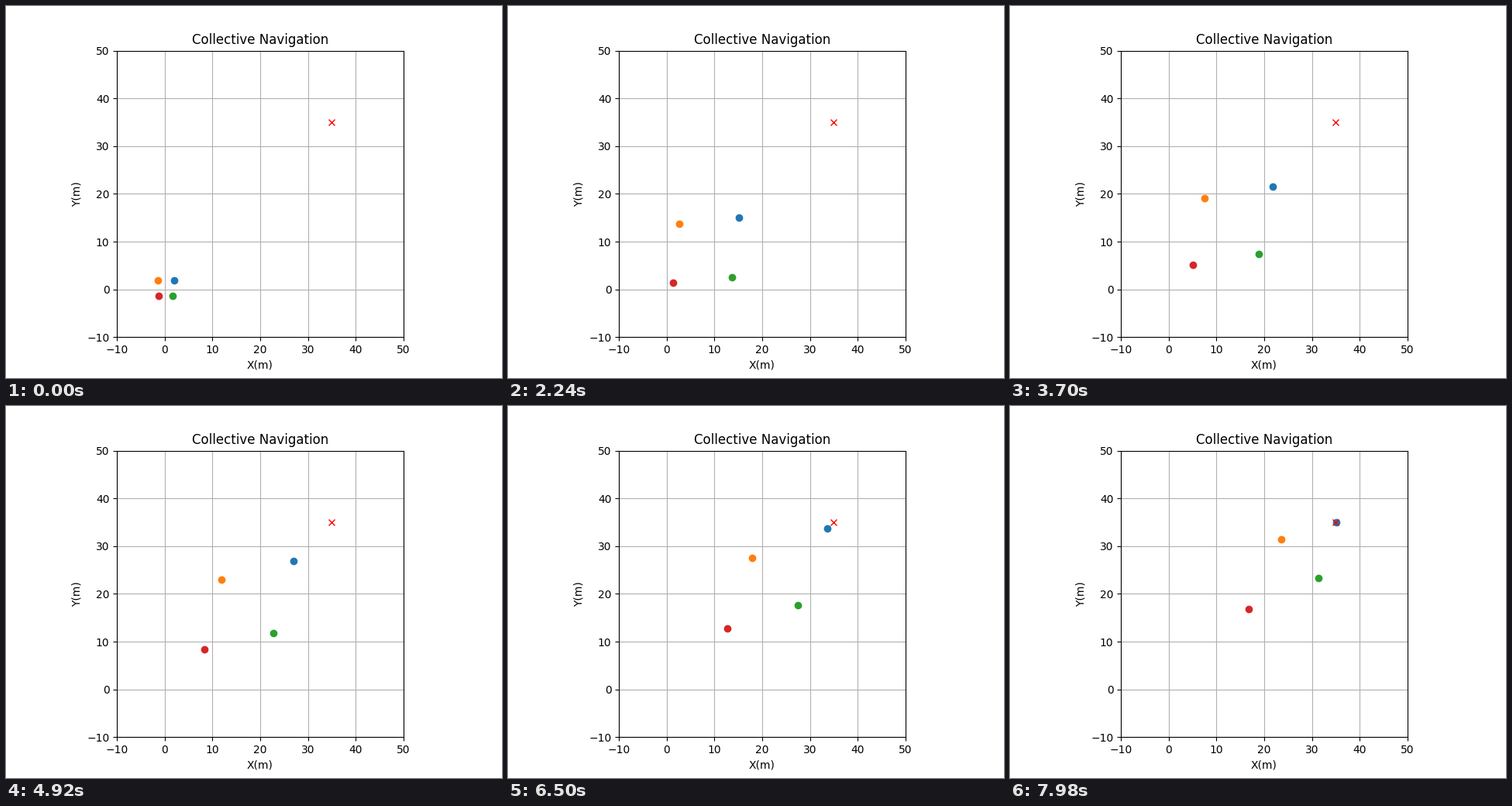
Write a matplotlib script that moves like this. It is 640 by 480 pixels and loops after 8 s.

```python
import numpy as np
import matplotlib.pyplot as plt
from matplotlib.animation import FuncAnimation

FRAMES, INTERVAL = 400, 20
DT = INTERVAL / 1000
SPEED = 5.0        # pull towards the goal, m/s
REPULSION = 125.0  # inverse-square push between agents
GOAL = np.array([35.0, 35.0])
START = np.array([[2.0, 1.9], [-1.35, 1.9], [1.7, -1.3], [-1.2, -1.3]])
COLORS = ["tab:blue", "tab:orange", "tab:green", "tab:red"]


def velocity(pos):
    to_goal = GOAL - pos
    dist = np.linalg.norm(to_goal, axis=1, keepdims=True)
    pull = SPEED * to_goal / np.maximum(dist, 1e-6)
    gap = pos[:, None] - pos[None]
    sep = np.linalg.norm(gap, axis=2, keepdims=True)
    sep[sep == 0] = np.inf
    push = REPULSION * (gap / sep**3).sum(axis=1)
    return pull + push


def simulate():
    path = [START]
    for _ in range(FRAMES - 1):
        path.append(path[-1] + DT * velocity(path[-1]))
    return np.array(path)


path = simulate()

fig, ax = plt.subplots(figsize=(6.4, 4.8), dpi=100)
ax.set_aspect("equal", adjustable="box")
ax.set_xlim(-10, 50)
ax.set_ylim(-10, 50)
ax.set_xticks(range(-10, 51, 10))
ax.set_yticks(range(-10, 51, 10))
ax.set_title("Collective Navigation")
ax.set_xlabel("X(m)")
ax.set_ylabel("Y(m)")
ax.grid(True)

dots = [ax.plot([], [], "o", color=c)[0] for c in COLORS]
ax.plot(*GOAL, "rx")


def update(i):
    for dot, (x, y) in zip(dots, path[i]):
        dot.set_data([x], [y])
    return dots


anim = FuncAnimation(fig, update, frames=FRAMES, interval=INTERVAL,
                     repeat=True, repeat_delay=0, blit=False)
plt.show()
```
